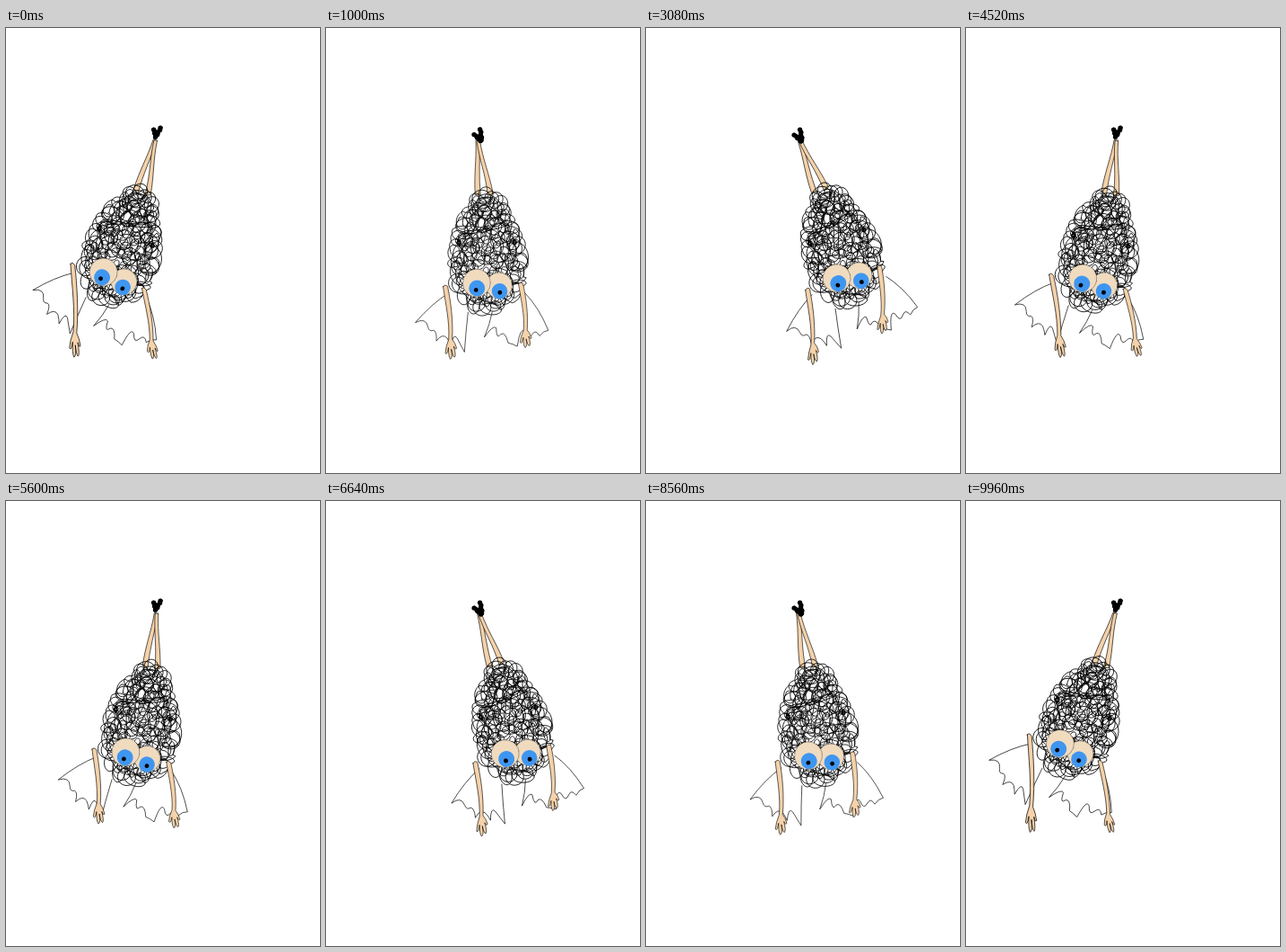
An HTML page with a canvas for the animation above (10 s loop, 350x495 px).

```html
<!DOCTYPE html>
<html lang="en">
<head>
<meta charset="utf-8">
<title>Swinging scribble</title>
<style>
html, body { margin: 0; width: 100%; height: 100%; overflow: hidden; background: #fff; }
canvas { display: block; width: 350px; height: 495px; }
</style>
</head>
<body>
<canvas id="stage"></canvas>
<script>
const W = 350, H = 495, LOOP = 10000, STEP = 40;
const LIMB = '#f5d2aa', LID = '#f0dbbf', BLUE = '#3f96f0', INK = '#000';
const PIVOT = [169, 117], WAIST = [-30, 170];
const canvas = document.getElementById('stage');
const ctx = canvas.getContext('2d');
const dpr = window.devicePixelRatio || 1;
canvas.width = W * dpr;
canvas.height = H * dpr;

const lerp = (a, b, u) => a + (b - a) * u;
const clamp = u => Math.max(0, Math.min(1, u));
const rad = deg => deg * Math.PI / 180;

let seed = 11;
function rnd() {
  seed = (seed * 16807) % 2147483647;
  return seed / 2147483647;
}

// One long looping pen line, ring by ring, filling an egg.
function scribble() {
  const path = new Path2D();
  let turn = 0;
  for (const rho of [1, 0.87, 0.7, 0.52, 0.34, 0.15]) {
    const loops = Math.round(43 * rho);
    const start = rnd() * 6.28;
    for (let k = 0; k < loops; k++) {
      const rx = 4.5 + rnd() * 5.5, ry = 4.5 + rnd() * 5.5;
      const jx = (rnd() - 0.5) * 9, jy = (rnd() - 0.5) * 9;
      for (let i = 0; i < 22; i++) {
        const a = start + (k + i / 22) / loops * 6.283;
        const fade = Math.sin(i / 22 * Math.PI);
        turn += 6.283 / 20.5;
        const x = 1 + rho * Math.sin(a) * (35.5 - 7 * Math.cos(a)) + rx * Math.cos(turn) + jx * fade;
        const y = 131 - rho * Math.cos(a) * 61 + ry * Math.sin(turn) + jy * fade;
        path.lineTo(x, y);
      }
    }
  }
  return path;
}

const hair = scribble();
const knots = new Path2D('M-32,117 q5,1 2,5 q-5,0 -1,-4 q4,3 1,6 M30,119 q5,0 3,4 q-5,1 -2,-3');
const legs = [
  new Path2D('M-2.5,8 C-3,30 -7,45 -7,68 L-1,70 C-2,48 1,30 1.5,9Z'),
  new Path2D('M-1.5,9 C0,30 6,45 7,70 L13,68 C10,45 4,30 2,8Z')
];
const arm = new Path2D('M-2,-1 C-1,18 2,38 -1,58 Q-5,66 -6,73 Q-4,76 -2,67 Q-3,77 -1,80' +
  ' Q2,79 1,69 Q2,78 4,78 Q6,76 4,66 Q6,71 7,68 Q6,62 3,58 C6,38 5,16 3,-1 Q0,-4 -2,-1Z');
const wings = [
  new Path2D('M-43,176 Q-62,187 -81,208 Q-69,202 -67,213 Q-66,219 -61,217 Q-57,218 -58,229' +
    ' Q-51,220 -46,226 Q-43,231 -42,235 Q-39,220 -35,226 Q-31,234 -27,242 Q-25,220 -22,198'),
  new Path2D('M5,198 Q2,212 -4.5,226 Q6,212 9,216 Q9,230 14,223 Q19,220 22,233' +
    ' Q27,234 32,237 Q36,214 41,221 Q44,232 49,224 Q53,218 57,226 Q62,220 67,220 Q57,194 42,178')
];

// Heel and toe of each foot in the two stances.
const feet = [
  [[167, 121, 165, 113], [173, 126, 165.5, 119]],
  [[167, 121, 172.5, 111], [174, 125, 172, 113]]
];

// Swing angle in degrees; positive means the body hangs to the left.
function swing(t) {
  if (t < 2530) return -23.2 + 25 * (1 - Math.cos(Math.PI * (2530 - t) / 3550));
  const ease = (t0, t1, a, b) => lerp(a, b, (1 - Math.cos(Math.PI * (t - t0) / (t1 - t0))) / 2);
  if (t < 5030) return ease(2530, 5030, -23.2, 13.1);
  if (t < 7500) return ease(5030, 7500, 13.1, -24.8);
  return ease(7500, 9990, -24.8, 18.7);
}

// Sideways shift of the hands over time.
const drift = [[0, 33], [1000, 2], [2000, -30], [2500, -29], [3080, -20], [3800, 4], [4520, 26],
  [5000, 30], [5700, 15], [6640, -12], [7500, -27], [8560, -7], [9300, 21], [9960, 36], [10000, 36]];

function handShift(t) {
  let i = 0;
  while (i < drift.length - 2 && t >= drift[i + 1][0]) i++;
  const slope = n => {
    const a = drift[Math.max(0, n - 1)], b = drift[Math.min(drift.length - 1, n + 1)];
    return (b[1] - a[1]) / (b[0] - a[0]);
  };
  const [t0, a] = drift[i], [t1, b] = drift[i + 1];
  const d = t1 - t0, u = (t - t0) / d, v = 1 - u;
  return v * v * (1 + 2 * u) * a + u * u * (3 - 2 * u) * b + d * u * v * (v * slope(i) - u * slope(i + 1));
}

function shape(path, fill, width) {
  if (fill) {
    ctx.fillStyle = fill;
    ctx.fill(path);
  }
  ctx.lineWidth = width;
  ctx.stroke(path);
}

function disc(x, y, r, fill, line) {
  ctx.beginPath();
  ctx.arc(x, y, r, 0, 7);
  ctx.fillStyle = fill;
  ctx.fill();
  if (line) {
    ctx.lineWidth = line;
    ctx.stroke();
  }
}

function drawArm(x, y, shift, length) {
  ctx.save();
  ctx.translate(x, y);
  ctx.transform(1, 0, shift / 80, length, 0, 0);
  shape(arm, LIMB, 0.6);
  ctx.restore();
}

function drawEye(x, y, r, ix, iy, ir, px, py) {
  disc(x, y, r, LID, 0.3);
  disc(ix, iy, ir, BLUE);
  disc(px, py, 2.4, INK);
}

function drawBody(bend) {
  ctx.save();
  ctx.translate(...WAIST);
  ctx.rotate(rad(bend));
  ctx.translate(-WAIST[0], -WAIST[1]);
  wings.forEach(w => shape(w, null, 0.65));
  shape(hair, null, 0.8);
  shape(knots, null, 1.6);
  ctx.restore();
}

function drawEyes(bend) {
  ctx.save();
  ctx.translate(...WAIST);
  ctx.rotate(rad(bend));
  ctx.translate(-WAIST[0], -WAIST[1]);
  drawEye(13.3, 169, 14.5, 13.8, 175.3, 8.8, 14, 176.7);
  drawEye(-11.7, 165.5, 15.5, -11.5, 171.5, 9, -12.5, 173.3);
  ctx.restore();
}

function drawFeet(angle) {
  const u = clamp((8 - angle) / 14), s = u * u * (3 - 2 * u);
  for (const [a, b] of feet) {
    const [hx, hy, tx, ty] = a.map((v, i) => lerp(v, b[i], s));
    ctx.lineWidth = 4.5;
    ctx.beginPath();
    ctx.moveTo(hx, hy);
    ctx.lineTo(tx, ty);
    ctx.stroke();
    for (let i = 0; i < 5; i++) {
      const side = i % 2 ? 0.5 : -0.5;
      disc(lerp(hx, tx, i / 4) + side, lerp(hy, ty, i / 4), 2.6, INK);
    }
  }
}

function draw(t) {
  const angle = swing(t), shift = handShift(t);
  const bend = (17 - angle) * 0.11;
  ctx.setTransform(dpr, 0, 0, dpr, 0, 0);
  ctx.fillStyle = '#fff';
  ctx.fillRect(0, 0, W, H);
  ctx.strokeStyle = INK;
  ctx.lineCap = ctx.lineJoin = 'round';

  ctx.save();
  ctx.translate(...PIVOT);
  ctx.rotate(rad(angle));
  legs.forEach(l => shape(l, LIMB, 0.6));
  drawBody(bend);
  drawArm(-47, 169, shift, 1 + Math.max(0, shift - 20) * 0.016);
  drawArm(37, 171, shift, 0.88);
  drawEyes(bend);
  ctx.restore();

  drawFeet(angle);
}

const begin = performance.now();
function tick() {
  const t = (performance.now() - begin) % LOOP;
  draw(Math.floor(t / STEP) * STEP);
  requestAnimationFrame(tick);
}
tick();
</script>
</body>
</html>
```
